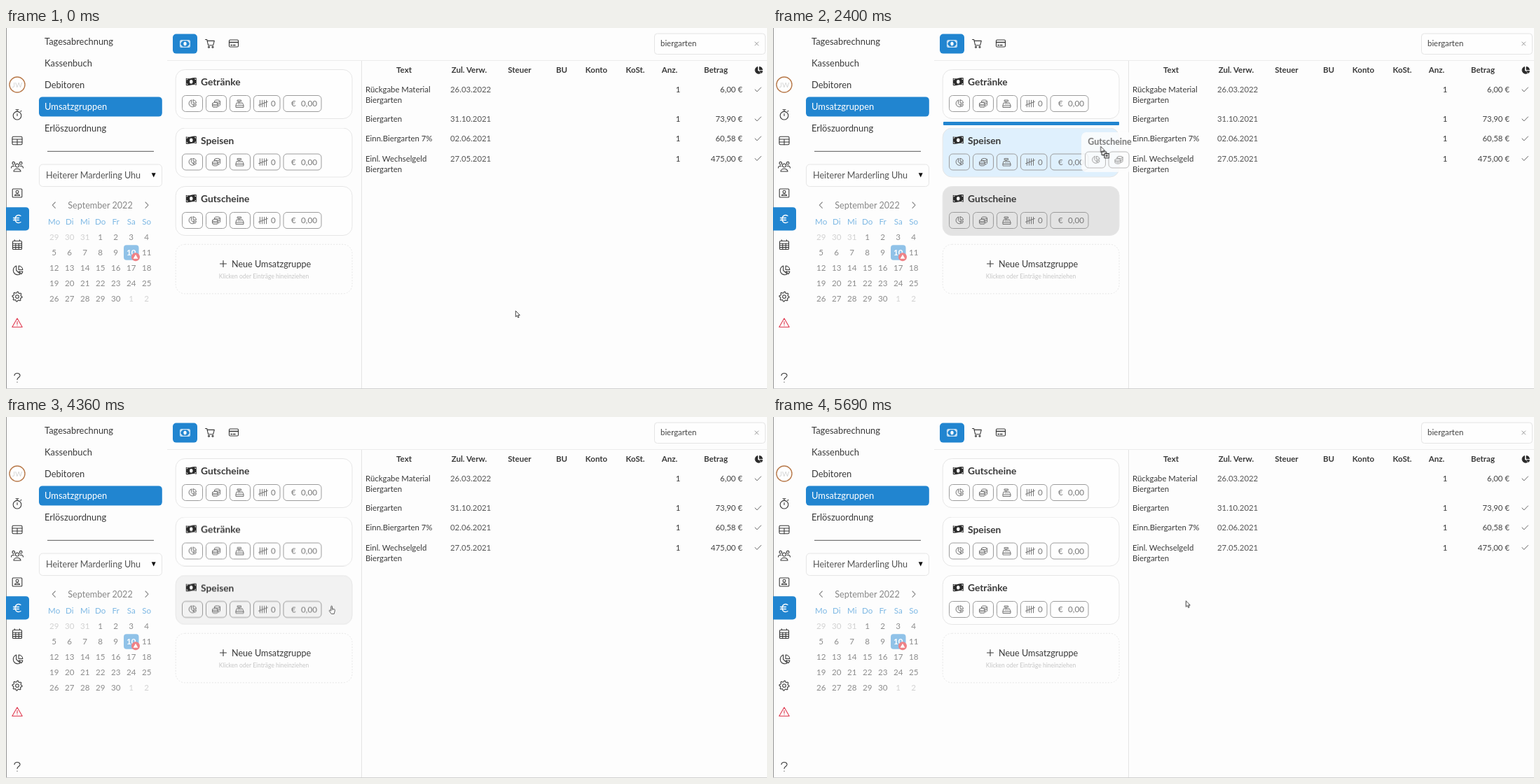
These frames come from a looping animation (1086x516 px, 5710 ms). An HTML page:

```html
<!DOCTYPE html>
<html lang="de">
<head>
<meta charset="utf-8">
<title>Umsatzgruppen</title>
<style>
html, body { margin: 0; width: 100%; height: 100%; overflow: hidden; background: #fdfdfd; }
svg { display: block; width: 100%; height: 100%; font-family: Lato, "Open Sans", sans-serif; }
text { fill: #3a3a3a; white-space: pre; }
.b { font-weight: 700; }
.m { text-anchor: middle; }
.e { text-anchor: end; }
.line { fill: none; stroke: #3a3a3a; stroke-width: 1.1; stroke-linecap: round; stroke-linejoin: round; }
.btn { fill: none; stroke: #9c9c9c; }
.ico { fill: none; stroke: #727272; stroke-linecap: round; stroke-linejoin: round; }
.bg { fill: #fefefe; stroke: #e6e6e6; }
#ghost .btn { stroke: #b8b8b8; }
#ghost .ico { stroke: #9c9c9c; }
#ghost text { fill: #777; }

/* one loop = 5710 ms */
.step { animation: 5710ms step-end infinite; }
.path { animation: 5710ms linear infinite; }

#drink { animation-name: drinkSlot; }
#food { animation-name: foodSlot; }
#voucher { animation-name: voucherSlot; }
@keyframes drinkSlot {
  0% { transform: translateY(59px); } 47.64% { transform: translateY(142.5px); }
  86.52%, 100% { transform: translateY(226px); }
}
@keyframes foodSlot {
  0% { transform: translateY(142.5px); } 47.64% { transform: translateY(226px); }
  86.52%, 100% { transform: translateY(142.5px); }
}
@keyframes voucherSlot {
  0% { transform: translateY(226px); } 47.64%, 100% { transform: translateY(59px); }
}

#drink .bg { animation-name: drinkFill; }
#food .bg { animation-name: foodFill; }
#voucher .bg { animation-name: voucherFill; }
@keyframes drinkFill {
  0% { fill: #fefefe; } 44.66% { fill: #dff0fd; } 47.64% { fill: #fefefe; }
  59.16% { fill: #f2f2f2; } 62.47% { fill: #fefefe; }
  80.4% { fill: #dff0fd; } 86.52%, 100% { fill: #fefefe; }
}
@keyframes foodFill {
  0% { fill: #fefefe; } 39.23% { fill: #dff0fd; } 43.78% { fill: #fefefe; }
  63.08% { fill: #f2f2f2; } 77.41% { fill: #e3e3e3; }
  86.52% { fill: #f2f2f2; } 94.9%, 100% { fill: #fefefe; }
}
@keyframes voucherFill {
  0% { fill: #fefefe; } 19.44% { fill: #f2f2f2; } 37.3% { fill: #e3e3e3; }
  47.64% { fill: #f2f2f2; } 58.55%, 100% { fill: #fefefe; }
}

#bar { animation-name: bar; }
@keyframes bar {
  0% { opacity: 0; transform: translateY(134px); } 39.23% { opacity: 1; transform: translateY(134px); }
  43.78% { opacity: 0; transform: translateY(50.5px); } 44.66% { opacity: 1; transform: translateY(50.5px); }
  47.64% { opacity: 0; transform: translateY(134px); } 80.4% { opacity: 1; transform: translateY(134px); }
  86.52%, 100% { opacity: 0; transform: translateY(134px); }
}

#cursor { animation-name: cursor; }
@keyframes cursor {
  0% { transform: translate(727px, 404px); }
  8.76% { transform: translate(727px, 404px); animation-timing-function: cubic-bezier(.35, .1, .6, .9); }
  17.51% { transform: translate(512px, 278.5px); }
  18.74% { transform: translate(488px, 271px); }
  21.54%, 35.2% { transform: translate(479px, 270px); }
  38.7% { transform: translate(473px, 219.5px); }
  45.18% { transform: translate(462px, 121.5px); }
  49.04%, 57.79% { transform: translate(463px, 114px); }
  64.97% { transform: translate(474px, 266px); }
  71.28%, 76.36% { transform: translate(464px, 270px); }
  80.91% { transform: translate(462px, 211px); animation-timing-function: ease-out; }
  85.46%, 93.17% { transform: translate(463px, 180px); animation-timing-function: linear; }
  99.65%, 100% { transform: translate(589px, 262.5px); }
}
#arrow { animation-name: arrow; }
#hand { animation-name: hand; }
#badge, #ghost { animation-name: drag; }
@keyframes arrow {
  0% { opacity: 1; } 19.44% { opacity: 0; } 37.3% { opacity: 1; } 47.64% { opacity: 0; }
  77.41% { opacity: 1; } 86.52% { opacity: 0; } 94.9%, 100% { opacity: 1; }
}
@keyframes hand {
  0% { opacity: 0; } 19.44% { opacity: 1; } 37.3% { opacity: 0; } 47.64% { opacity: 1; }
  77.41% { opacity: 0; } 86.52% { opacity: 1; } 94.9%, 100% { opacity: 0; }
}
@keyframes drag {
  0% { opacity: 0; } 37.3% { opacity: 1; } 47.64% { opacity: 0; }
  77.41% { opacity: 1; } 86.52%, 100% { opacity: 0; }
}
#ghostPos { animation-name: ghostPos; }
@keyframes ghostPos {
  0%, 37.3% { transform: translate(451px, 225px); }
  38.7% { transform: translate(446.5px, 205px); }
  45.18% { transform: translate(434px, 96.5px); }
  47.64% { transform: translate(436px, 92px); }
  77.41% { transform: translate(434.5px, 231px); }
  80.91% { transform: translate(434.5px, 185px); animation-timing-function: ease-out; }
  85.46%, 100% { transform: translate(435px, 154px); }
}
#first { animation-name: first; }
#second { animation-name: second; }
@keyframes first { 0% { opacity: 1; } 60%, 100% { opacity: 0; } }
@keyframes second { 0% { opacity: 0; } 60%, 100% { opacity: 1; } }
</style>
</head>
<body>
<svg id="stage" viewBox="0 0 1086 516">
  <defs>
    <g id="pie"><path d="M-1-5A5 5 0 1 0 3.2 4L-1 0Z"/><path d="M1.6-5V-.8H6A4.6 4.6 0 0 0 1.6-5ZM1.8 1.2H6A5 5 0 0 1 4.6 4Z"/></g>
    <g id="coins">
      <ellipse cx="1.5" cy="-3.5" rx="4" ry="1.6"/>
      <path d="M-2.5-3.5V-1.5M5.5-3.5V2C5.5 3 4 3.5 2.5 3.6M5.5-.8C5.3 0 4 .5 2.5.7"/>
      <ellipse cx="-1.5" cy="0" rx="4" ry="1.6"/>
      <path d="M-5.5 0V4C-5 6 2 6 2.5 4V0M-5.5 2C-5 4 2 4 2.5 2"/>
    </g>
    <g id="register"><path d="M-4-1H4L5.5 3V5.5H-5.5V3ZM-5.5 3H5.5M-3-5H2V-3H-3ZM-1-3V-1M-2 1H-1.8M0 1H.2M2 1H2.2"/></g>
    <g id="tally"><path d="M-4.5-4.5V5M-1.5-4.5V5M1.5-4.5V5M4.5-4.5V5M-6.5 2.5L6.5-2.5"/></g>
    <g id="note" fill="#2b2b2b">
      <path d="M-7.5-5Q-3.7-3.8 0-4.9T7.5-5.4V5Q3.7 3.8 0 4.9T-7.5 5.4Z"/>
      <ellipse rx="2.2" ry="2.8" fill="#fff"/>
      <path d="M-6.2-2.4V-3.4H-4.9M6.2 2.4V3.4H4.9M-6.2 2.7V3.8H-4.9M6.2-2.7V-3.8H4.9" fill="none" stroke="#fff"/>
    </g>
  </defs>
</svg>
<script>
const BLUE = '#2185d0';
const text = (x, y, s, size, attr = '') => `<text x="${x}" y="${y}" font-size="${size}" ${attr}>${s}</text>`;
const rect = (x, y, w, h, r, attr) => `<rect x="${x}" y="${y}" width="${w}" height="${h}" rx="${r}" ${attr}/>`;
const path = (d, attr = 'class="line"') => `<path d="${d}" ${attr}/>`;
const use = (id, x, y, attr = 'class="ico"') => `<use href="#${id}" x="${x}" y="${y}" ${attr}/>`;
const at = (x, y, body, attr = 'class="line"') => `<g transform="translate(${x} ${y})" ${attr}>${body}</g>`;

function rail() {
  const gear = Array.from({ length: 33 }, (_, i) => {
    const a = i / 32 * 2 * Math.PI, r = i % 4 < 2 ? 7 : 5.4;
    return (i ? 'L' : 'M') + (r * Math.cos(a)).toFixed(2) + ' ' + (r * Math.sin(a)).toFixed(2);
  }).join('') + 'Z';
  return path('M.5 0V516', 'stroke="#949494"') + path('M0 515.5H1086', 'stroke="#d0d0d0"') +
    '<circle cx="16" cy="81" r="11" fill="#fff" stroke="#b87a4b" stroke-width="1.4"/>' +
    text(16, 84.7, 'JW', 10, 'class="m" style="fill:#d4d4d4"') +
    at(16, 124, '<circle cy="1.2" r="5.8"/><path d="M-2-7.3H2M0-7V-4.6M0-1.5V1.5M4.8-4.6L5.8-5.6"/>') +
    at(16, 161, '<rect x="-7" y="-5.8" width="14" height="11.6" rx="1.5"/><path d="M-7-2H7M-7 2H7M0-2V5.8"/>') +
    at(16, 198, '<circle cy="-1.5" r="2.5"/><circle cx="-5.2" cy="-4.8" r="1.8"/><circle cx="5.2" cy="-4.8" r="1.8"/><path d="M-5 7C-5 2 5 2 5 7ZM-8.5 2C-8.5-.5-6-1.3-4.2-.6M8.5 2C8.5-.5 6-1.3 4.2-.6"/>') +
    at(16, 236, '<rect x="-6.8" y="-6" width="13.6" height="12" rx="1"/><circle cy="-1.8" r="1.9"/><path d="M-3.5 3.5C-3.5.8 3.5.8 3.5 3.5Z"/>') +
    path('M0 256.2H28Q33 256.2 33 261V284.6Q33 289.4 28 289.4H0Z', `fill="${BLUE}"`) +
    at(16, 273, '<path d="M5-4.5C1-7-3-4.5-3 0S1 7 5 4.5M-5.5-1.5H2.5M-5.5 1.5H2.5"/>', 'class="line" style="stroke:#fff;stroke-width:1.3"') +
    at(16, 310, '<rect x="-6.5" y="-5.5" width="13" height="12" rx="1.3"/><path d="M-6.5-2H6.5M-6.5.8H6.5M-6.5 3.6H6.5M-2.2-2V6.5M2.2-2V6.5M-3.5-7.3V-5.5M3.5-7.3V-5.5"/>') +
    at(16, 346.5, '<use href="#pie" transform="scale(1.3)"/>', 'class="line" style="stroke-width:.85"') +
    at(16, 384, path(gear, '') + '<circle r="2.3"/>') +
    at(16, 421.5, '<path d="M0-6.5L7.2 6H-7.2ZM0-2V2M0 3.9V4"/>', 'class="line" style="stroke:#e03a50"') +
    at(16, 500, '<path d="M-4-3.4C-3.6-7.6 4.4-7.4 4-3C3.7-.4 0-.5 0 2.6M0 6V6.2"/>');
}

function menu() {
  const items = ['Tagesabrechnung', 'Kassenbuch', 'Debitoren', 'Umsatzgruppen', 'Erlöszuordnung'];
  return rect(47, 98.4, 175.8, 28.2, 5, `fill="${BLUE}"`) +
    items.map((s, i) => text(55, 24 + 31 * i, s, 12.9, i === 3 ? 'style="fill:#fff"' : '')).join('') +
    path('M59 176.3H211', 'stroke="#555"') +
    rect(47.5, 195, 175, 31.5, 5, 'fill="#fefefe" stroke="#e6e6e6"') +
    text(57, 215, 'Heiterer Marderling Uhu', 12.6, 'style="fill:#555"') +
    path('M207.7 207.2H213.7L210.7 213.4Z', 'fill="#111"');
}

function calendar() {
  const col = i => 68.7 + 22 * i;
  let out = text(134.5, 258, 'September 2022', 12.6, 'class="m" style="fill:#888"') +
    path('M70.3 249L66.3 253.2 70.3 257.4M199 249L203 253.2 199 257.4', 'class="line" style="stroke:#888"');
  ['Mo', 'Di', 'Mi', 'Do', 'Fr', 'Sa', 'So'].forEach((s, i) => {
    out += text(col(i), 281, s, 11.6, 'class="m" style="fill:#7db8e4"');
  });
  out += rect(168, 310.3, 21.5, 21.5, 4, 'fill="#90c2e8"');
  for (let i = 0; i < 35; i++) {
    const other = i < 3 || i > 32, day = i < 3 ? 29 + i : other ? i - 32 : i - 2;
    const fill = i === 12 ? '#fff' : other ? '#d2d2d2' : '#8c8c8c';
    out += text(col(i % 7), 303 + 22 * Math.floor(i / 7), day, 11.6, `class="m${i === 12 ? ' b' : ''}" style="fill:${fill}"`);
  }
  return out + '<circle cx="185" cy="327.3" r="6" fill="#ee8287"/>' + path('M185 323.8L188.4 329.8H181.6Z', 'fill="#fff"');
}

function toolbar() {
  return path('M230 46.5H1086', 'stroke="#ececec"') + path('M507.5 47V515', 'stroke="#e4e4e4"') +
    rect(238, 8.6, 35, 28, 5, `fill="${BLUE}"`) +
    at(255.5, 22.5, '<rect x="-6.7" y="-4.7" width="13.4" height="9.4" rx="1"/><ellipse rx="1.6" ry="2.2" fill="#fff"/><path d="M-6.5-2.2Q-4.5-2.5-4.3-4.4M6.5-2.2Q4.5-2.5 4.3-4.4M-6.5 2.2Q-4.5 2.5-4.3 4.4M6.5 2.2Q4.5 2.5 4.3 4.4"/>', 'class="line" style="stroke:#fff"') +
    at(291, 22, '<path d="M-6.5-5.5H-4.3L-2.3 2.8H4.6L6.3-3.6H-3.8"/><circle cx="-1.5" cy="5.2" r="1"/><circle cx="4" cy="5.2" r="1"/>') +
    at(325, 22, '<rect x="-6.5" y="-5" width="13" height="10" rx="1.4"/><path d="M-6.5-1.6H6.5M-4 2.4H-2.6M-.6 2.4H2" stroke-width="1.5"/>') +
    rect(925.5, 8, 158, 29.5, 4, 'fill="#fefefe" stroke="#e4e4e4"') +
    text(934, 26, 'biergarten', 11.4, 'style="fill:#444"') +
    path('M1068.5 19.7L1074 25.2M1074 19.7L1068.5 25.2', 'stroke="#999"');
}

function table() {
  const heads = [['Text', 568], ['Zul. Verw.', 661], ['Steuer', 733], ['BU', 793], ['Konto', 842.5], ['KoSt.', 898], ['Anz.', 947], ['Betrag', 1013]];
  const rows = [
    [92, ['Rückgabe Material', 'Biergarten'], '26.03.2022', '6,00 €'],
    [134, ['Biergarten'], '31.10.2021', '73,90 €'],
    [162, ['Einn.Biergarten 7%'], '02.06.2021', '60,58 €'],
    [190.5, ['Einl. Wechselgeld', 'Biergarten'], '27.05.2021', '475,00 €']
  ];
  return heads.map(([s, x]) => text(x, 64, s, 11.5, 'class="b m"')).join('') +
    use('pie', 1073.5, 60.5, 'fill="#2b2b2b" stroke="#2b2b2b"') +
    rows.map(([y, lines, date, sum]) =>
      lines.map((s, i) => text(513, y + 15 * i, s, 11.4)).join('') +
      text(634, y, date, 11.4, 'style="fill:#555"') +
      text(959, y, '1', 11.4, 'class="m"') + text(1051, y, sum, 11.4, 'class="e" style="fill:#444"') +
      path(`M1069 ${y - 4}L1071.7 ${y - 1} 1077.5 ${y - 7}`, 'class="line" style="stroke:#666;stroke-width:1"')
    ).join('');
}

function card(id, title) {
  const buttons = [[251.5, 29], [285.5, 29], [319.5, 29], [353.5, 37.5], [396, 54]];
  return `<g id="${id}" class="step">` + rect(242.2, .5, 251.8, 70, 13, 'class="bg step"') +
    use('note', 264.3, 17.7, '') + text(278, 23, title, 13.8, 'class="b"') +
    buttons.map(([x, w]) => rect(x, 37.5, w, 23, 5, 'class="btn"')).join('') +
    use('pie', 265.5, 49) + use('coins', 300, 49) + use('register', 333.5, 49) + use('tally', 367, 48.8) +
    text(381.5, 53, '0', 11.7, 'class="m" style="fill:#777"') +
    text(407, 53, '€', 11.7, 'style="fill:#777"') + text(421, 53, '0,00', 11.7, 'style="fill:#777"') + '</g>';
}

function groups() {
  return card('drink', 'Getränke') + card('food', 'Speisen') + card('voucher', 'Gutscheine') +
    rect(242.2, 309.3, 251.8, 70.5, 13, 'fill="none" stroke="#e6e6e6" stroke-dasharray="2 2"') +
    path('M305.5 337H314.5M310 332.5V341.5') + text(322, 341.5, 'Neue Umsatzgruppe', 12.6) +
    text(368, 358, 'Klicken oder Einträge hineinziehen', 8.5, 'class="m" style="fill:#c6c6c6"') +
    rect(243, 0, 251, 5, 1, `id="bar" class="step" fill="${BLUE}"`);
}

function pointer() {
  const label = (id, s) => `<g id="${id}" class="step">${text(9.3, 18.3, s, 12.4, 'class="b"')}</g>`;
  return '<g id="ghostPos" class="path"><g id="ghost" class="step">' +
    rect(0, 0, 73, 57, 7, 'fill="#fdfdfd" fill-opacity=".85"') +
    label('first', 'Gutscheine') + label('second', 'Speisen') +
    rect(5.5, 28, 29, 23, 5, 'class="btn"') + rect(39, 28, 29, 23, 5, 'class="btn"') +
    use('pie', 20, 39.5) + use('coins', 53.5, 39.5) +
    '</g></g><g id="cursor" class="path">' +
    '<g id="arrow" class="step">' + path('M.3.3V8.8L2.3 7 3.7 10 5.1 9.4 3.8 6.5H6.3Z', 'fill="#fff" stroke="#333" stroke-width=".9"') +
    '<g id="badge" class="step" fill="#fff" stroke="#222" stroke-width="1.1">' +
    rect(1.8, 8, 6.5, 4.6, .6, '') + rect(5.6, 10.6, 6.6, 6.4, .6, '') + path('M7.2 13.8H10.6M8.9 12.1V15.5', '') + '</g></g>' +
    '<g id="hand" class="step">' +
    path('M-.2 7.3V1.2C-.2 0 1.5 0 1.5 1.2V4.4L4.3 4.9Q5.5 5.2 5.4 6.4L4.8 9.2 4.2 11.5H.4L-2.6 7.6C-3.2 6.6-2 5.8-1.2 6.5Z', 'fill="#fff" stroke="#444" stroke-width=".9"') +
    path('M1.5 4.4V6.4M3 4.8V6.5', 'stroke="#666" stroke-width=".6"') + '</g></g>';
}

document.getElementById('stage').insertAdjacentHTML('beforeend',
  rail() + menu() + calendar() + toolbar() + groups() + table() + pointer());
</script>
</body>
</html>
```
